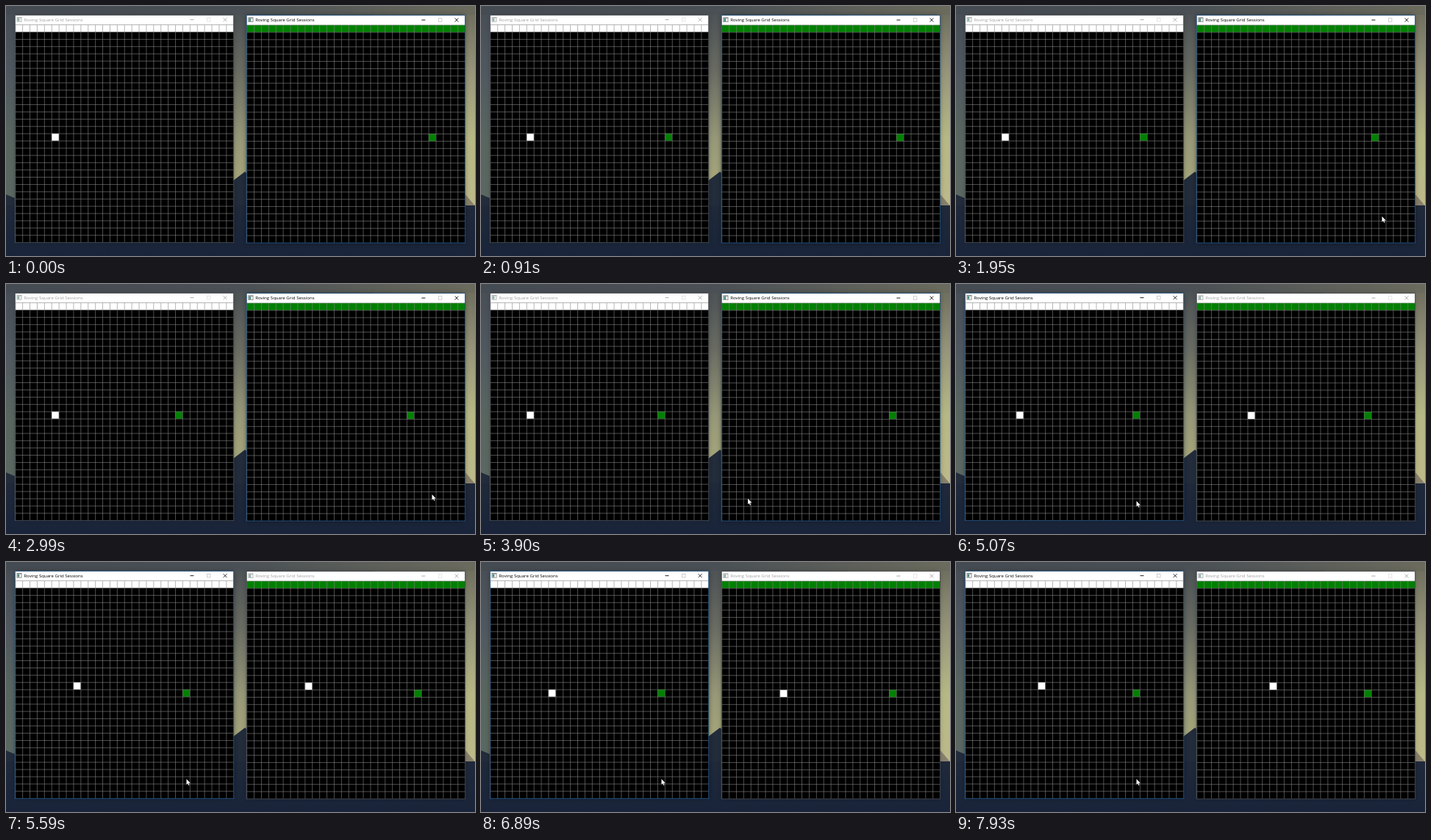
These frames come from a looping animation (638x341 px, 8000 ms). An HTML page with a canvas:

```html
<!DOCTYPE html>
<html lang="en">
<head>
<meta charset="utf-8">
<title>Roving Square Grid Sessions</title>
<style>
html, body { margin: 0; width: 100%; height: 100%; overflow: hidden; background: #1b263a; }
canvas { display: block; width: 638px; height: 341px; }
</style>
</head>
<body>
<canvas id="stage"></canvas>
<script>
const LOOP = 8000, TICK = 130, WIDTH = 638, HEIGHT = 341;
const CELLS = 30, CELL = 9.9, SIZE = CELLS * CELL, BAR = 12.8;
const GREEN = '#008000', WHITE = '#fff', GRID = '#858585';
const GREEN_SHARED = 390, WHITE_SHARED = 4500, FOCUS_CHANGE = 4290;
const canvas = document.getElementById('stage');
const ctx = canvas.getContext('2d');
const ratio = window.devicePixelRatio || 1;
canvas.width = WIDTH * ratio;
canvas.height = HEIGHT * ratio;
ctx.scale(ratio, ratio);

function fill(color, x, y, w, h) {
  ctx.fillStyle = color;
  ctx.fillRect(x, y, w, h);
}

function outline(color, x, y, w, h) {
  ctx.strokeStyle = color;
  ctx.lineWidth = .8;
  ctx.strokeRect(x, y, w, h);
}

function line(color, width, x1, y1, x2, y2) {
  ctx.strokeStyle = color;
  ctx.lineWidth = width;
  ctx.beginPath();
  ctx.moveTo(x1, y1);
  ctx.lineTo(x2, y2);
  ctx.stroke();
}

function shade(x1, y1, x2, y2, ...colors) {
  const g = ctx.createLinearGradient(x1, y1, x2, y2);
  colors.forEach((color, i) => g.addColorStop(i / (colors.length - 1), color));
  return g;
}

function peak(color, x, y, spread) {
  ctx.fillStyle = color;
  ctx.beginPath();
  ctx.moveTo(x - spread, HEIGHT);
  ctx.lineTo(x, y);
  ctx.lineTo(x + spread, HEIGHT);
  ctx.fill();
}

function drawBackdrop() {
  const sky = (x, ...colors) => fill(shade(0, 0, 0, 270, ...colors), x, 0, WIDTH, HEIGHT);
  sky(0, '#474d54', '#4f5860', '#59665f', '#5b6862');
  sky(200, '#4a4f54', '#696c62', '#979878', '#adad7c');
  sky(500, '#6b6a5b', '#96957a', '#b6b885', '#bdb98a');
  fill(shade(0, 0, WIDTH, 0, '#454b52', '#4a5055', '#6b6b5d'), 0, 0, WIDTH, 12);
  peak('#222c3b', 0, 257, 200);
  peak('#222c3b', 325, 226, 150);
  peak('#87816b', 625, 257, 70);
  fill(shade(0, 272, 0, HEIGHT, '#1f293a', '#19243a'), 0, 272, WIDTH, 69);
}

function drawTitleBar(x, y, active) {
  const ink = active ? '#000' : '#a0a0a0';
  fill('#fff', x, y, SIZE, BAR);
  fill(active ? '#777' : '#aaa', x + 2, y + 2.5, 7, 6.5);
  fill('#eee', x + 2.7, y + 3.8, 5.6, 4.5);
  fill(active ? '#4b8f83' : '#8db5ac', x + 3, y + 4.1, 2.6, 3.9);
  ctx.fillStyle = ink;
  ctx.font = '6.1px "Open Sans", sans-serif';
  ctx.fillText('Roving Square Grid Sessions', x + 11.8, y + 8.1);

  const button = x + 240.5, mid = y + 6.1;
  line(ink, .9, button - 2.5, mid, button + 2.5, mid);
  outline(active ? '#c4c4c4' : '#e0e0e0', button + 20.5, mid - 2.3, 4.5, 4.5);
  for (const tilt of [-2.5, 2.5])
    line(ink, .8, button + 42.6, mid - tilt, button + 47.6, mid + tilt);
}

function drawWindow(x, y, active, headColor, players) {
  const top = y + BAR;
  ctx.shadowColor = active ? 'rgba(0,0,0,.45)' : 'rgba(0,0,0,.25)';
  ctx.shadowBlur = 7 * ratio;
  fill('#000', x, y, SIZE, BAR + SIZE);
  ctx.shadowBlur = 0;

  fill(headColor, x, top, SIZE, CELL);
  for (const { color, col, row } of players)
    fill(color, x + col * CELL, top + row * CELL, CELL, CELL);
  for (let i = 0; i < CELLS; i++) {
    const p = i * CELL + .25;
    line(GRID, .6, x + p, top, x + p, top + SIZE);
    line(GRID, .6, x, top + p, x + SIZE, top + p);
  }
  drawTitleBar(x, y, active);
  outline(active ? '#24598c' : '#4a4f55', x - .3, y - .3, SIZE + .6, BAR + SIZE + .6);
}

function drawPointer(x, y) {
  ctx.save();
  ctx.translate(x, y);
  ctx.fillStyle = '#fff';
  ctx.fill(new Path2D('M0 0V7.6L1.7 6.1 2.9 8.8 4 8.3 2.9 5.7 5.2 5.5Z'));
  ctx.restore();
}

// Each letter is one key press (Left, Right, Up, Down); a dot is a pause.
function walk(color, col, row, keys, begin, interval, t) {
  const pressed = Math.max(0, Math.floor((t - begin) / interval) + 1);
  for (const key of keys.slice(0, pressed)) {
    col += (key === 'R') - (key === 'L');
    row += (key === 'D') - (key === 'U');
  }
  return { color, col, row };
}

function ease(t, begin, end) {
  const u = Math.min(1, Math.max(0, (t - begin) / (end - begin)));
  return u * u * (3 - 2 * u);
}

function draw(t) {
  const green = walk(GREEN, 25, 15, 'L.....LLR', 100, 400, t);
  const white = walk(WHITE, 5, 15, 'RRRURDLRRU', WHITE_SHARED, 350, t);
  const leftActive = t >= FOCUS_CHANGE;
  drawBackdrop();
  drawWindow(12.5, 12.6, leftActive, WHITE, t < GREEN_SHARED ? [white] : [white, green]);
  drawWindow(327.4, 13, !leftActive, GREEN, t < WHITE_SHARED ? [green] : [green, white]);

  const tick = Math.floor(t / TICK) * TICK;
  const enter = ease(tick, 1430, 1820), cross = ease(tick, 3510, 4160);
  drawPointer(640 - 60.5 * enter - 334 * cross, 300 - 13 * enter + 9 * cross);
}

const start = performance.now();
function frame() {
  draw((performance.now() - start) % LOOP);
  requestAnimationFrame(frame);
}
frame();
</script>
</body>
</html>
```
